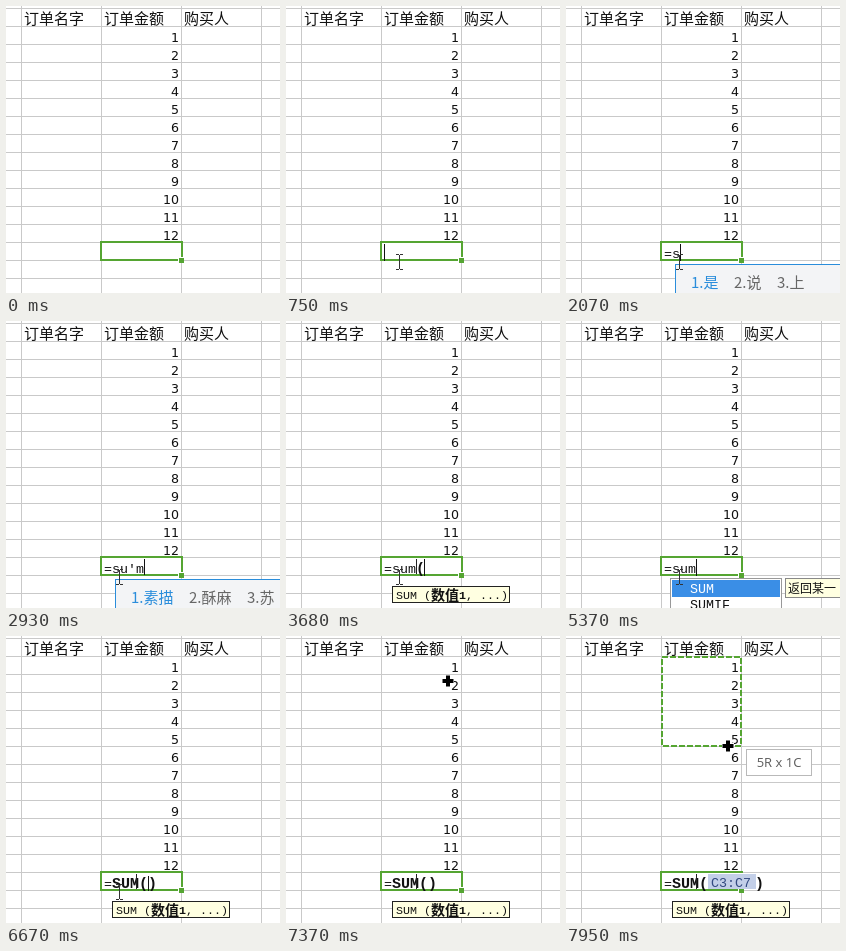
Recreate the animation shown at these times as an HTML page with a canvas. Size 274x287 px, loop 8000 ms.

```html
<!DOCTYPE html>
<html lang="zh">
<head>
<meta charset="utf-8">
<style>
html, body { margin: 0; width: 100%; height: 100%; overflow: hidden; background: #fff; }
canvas { display: block; }
</style>
</head>
<body>
<canvas id="stage" width="274" height="287"></canvas>
<script>
const LOOP = 8000;
const GREEN = '#55a532', GRID = '#c9c9c9', BLUE = '#2a8ddb';
const CJK = '"Noto Sans CJK SC", "Noto Sans CJK", sans-serif';
const mono = (size, weight = '') => `${weight} ${size}px "Liberation Mono", ${CJK}`;
const REGULAR = mono(13.33), BOLD = mono(15, 'bold');
const g = document.getElementById('stage').getContext('2d');

// start time, plain text, bold text, caret x, popup, candidates
const EDITS = [
  [0, '', '', 0],
  [610, '', '', 98],
  [1810, '=', '', 106],
  [2070, '=s', '', 114, 'ime', ['是', '说', '上']],
  [2250, '=su', '', 122, 'ime', ['速', '苏', '宿']],
  [2430, "=su'm", '', 138, 'ime', ['素描', '酥麻', '苏']],
  [3130, '=sum', '', 130, 'list'],
  [3630, '=sum', '(', 138, 'hint'],
  [3750, '=sum', '()', 146, 'hint'],
  [4740, '=sum', '(', 138, 'hint'],
  [4920, '=sum', '', 130, 'list'],
  [5670, '=', 'SUM()', 142, 'hint'],
];
const CLICK = 7490, DRAG = 7810;

function rect(x, y, w, h, color) {
  g.fillStyle = color;
  g.fillRect(x, y, w, h);
}

function box(x, y, w, h, fill, border) {
  rect(x, y, w, h, border);
  rect(x + 1, y + 1, w - 2, h - 2, fill);
}

function text(s, x, y, font, color = '#111', align = 'left') {
  g.font = font;
  g.fillStyle = color;
  g.textAlign = align;
  g.fillText(s, x, y);
}

function sheet() {
  rect(0, 0, 274, 287, '#fff');
  for (let y = 2; y < 287; y += 18) rect(0, y, 274, 1, GRID);
  for (let x = 15; x < 274; x += 80) rect(x, 0, 1, 287, GRID);
  ['订单名字', '订单金额', '购买人'].forEach((s, i) => text(s, 18 + 80 * i, 17.5, '300 15px ' + CJK));
  for (let n = 1; n <= 12; n++)
    text(n, 173, 18 + 18 * n, '12.6px "DejaVu Sans", sans-serif', '#111', 'right');
}

function activeCell() {
  g.strokeStyle = GREEN;
  g.lineWidth = 2;
  g.strokeRect(95, 236, 81, 18);
  rect(172, 251, 6, 6, '#fff');
  rect(173, 252, 5, 5, GREEN);
}

function formula(plain, bold, caret, on, t) {
  text(plain, 98, 252, REGULAR);
  text(bold, 98 + 8 * plain.length, 252, BOLD);
  if (t >= 3130) rect(130, 238, 1, 15, '#222');
  if (!caret) return;
  if (caret === 142) {
    if (on) rect(142, 240, 1, 15, '#111');
  } else {
    rect(caret, 238, 1, on ? 17 : 16, '#111');
  }
}

function rangeFormula(rows) {
  const ref = rows > 1 ? 'C3:C' + (2 + rows) : 'C3';
  const w = 8 * ref.length + 8;
  rect(97, 237, 48 + w, 16, '#fff');
  text('=', 98, 252, REGULAR);
  text('SUM(', 106, 252, BOLD);
  rect(130, 238, 1, 15, '#222');
  rect(142, 238, w, 15, '#c3cfe8');
  text(ref, 145, 251, REGULAR, '#334a80');
  text(')', 141 + w, 252, BOLD);
}

function hint() {
  box(106, 265, 118, 17, '#ffffe1', '#222');
  const font = mono(11.67);
  text('SUM (', 110, 278, font);
  text('数值', 145, 278.5, 'bold 14px ' + CJK);
  text('1', 173, 278, mono(11.67, 'bold'));
  text(', ...)', 180, 278, font);
}

function ime(words) {
  box(109, 258, 180, 40, '#f3f4f6', BLUE);
  let x = 125;
  words.forEach((w, i) => {
    text(`${i + 1}.${w}`, x, 282, '15px ' + CJK, i ? '#666' : BLUE);
    x += 28 + 15 * w.length;
  });
}

function list() {
  box(104, 257, 112, 40, '#fff', '#999');
  rect(106, 259, 108, 17, '#3a8ee6');
  text('SUM', 124, 272, REGULAR, '#fff');
  text('SUMIF', 124, 288, REGULAR);
  box(219, 257, 80, 20, '#ffffe1', '#888');
  text('返回某一', 222, 272, '12px ' + CJK);
}

function iBeam(x, y) {
  rect(x, y - 7, 1, 14, '#333');
  for (const dy of [-8, 7]) {
    rect(x - 3, y + dy, 3, 1, '#333');
    rect(x + 1, y + dy, 3, 1, '#333');
  }
}

function cross(x, y) {
  for (const [r, b, c] of [[6, 3, '#fff'], [5.5, 2, '#000']]) {
    rect(x - r, y - b, 2 * r, 2 * b, c);
    rect(x - b, y - r, 2 * b, 2 * r, c);
  }
}

function ring(x, y, p) {
  g.strokeStyle = 'rgba(120,150,190,.5)';
  g.lineWidth = 1;
  g.beginPath();
  g.arc(x, y, 14 + 15 * Math.min(1, p), 0, 7);
  g.stroke();
}

const curve = (a, b, c, u) => (1 - u) ** 2 * a + 2 * u * (1 - u) * b + u * u * c;

function pointer(t) {
  if (t < 110) return null;
  if (t < 750) {
    const u = Math.min(1, Math.floor((t - 110) / 80) / 4);
    return [136 - 23 * u, 273 - 18 * u];
  }
  if (t < 6870) return [113, 256];
  if (t < 7430) {
    const u = (Math.floor((t - 6870) / 62) + 1) / 9;
    return [curve(113, 290, 162, u), curve(256, 150, 45, u)].map(Math.round);
  }
  if (t < DRAG) return [162, 37];
  return [162, [64, 88, 110][Math.min(2, Math.floor((t - DRAG) / 70))]];
}

function selection(rows, y) {
  g.strokeStyle = GREEN;
  g.lineWidth = 2;
  g.setLineDash([6, 2]);
  g.strokeRect(96, 21, 79, 18 * rows - 1);
  g.setLineDash([]);
  if (rows > 1) {
    box(180, y + 3, 66, 27, '#fff', '#b9b9b9');
    text(`${rows}R x 1C`, 213, y + 21, '13px "Open Sans", sans-serif', '#5c5c5c', 'center');
  }
}

function draw(t) {
  const [start, plain, bold, caret, popup, words] = EDITS.findLast(e => e[0] <= t);
  const on = Math.floor((t - start) / 500) % 2 === 0 && t < 6870;
  const p = pointer(t);
  sheet();
  activeCell();
  if (t < CLICK) {
    formula(plain, bold, caret, on, t);
  } else {
    const rows = Math.ceil((p[1] - 20) / 18);
    rangeFormula(rows);
    selection(rows, p[1]);
  }
  if (popup === 'hint') hint();
  if (popup === 'ime') ime(words);
  if (popup === 'list') list();
  if (t >= 610 && t < 750) ring(112, 255, (t - 610) / 70);
  if (t >= CLICK && t < DRAG) ring(162, 38, (t - CLICK) / 140);
  if (p) {
    const editing = t >= 750 && p[1] > 236 && p[0] < 176;
    (editing ? iBeam : cross)(...p);
  }
}

const begin = performance.now();
function tick() {
  draw((performance.now() - begin) % LOOP);
  requestAnimationFrame(tick);
}
tick();
</script>
</body>
</html>
```
